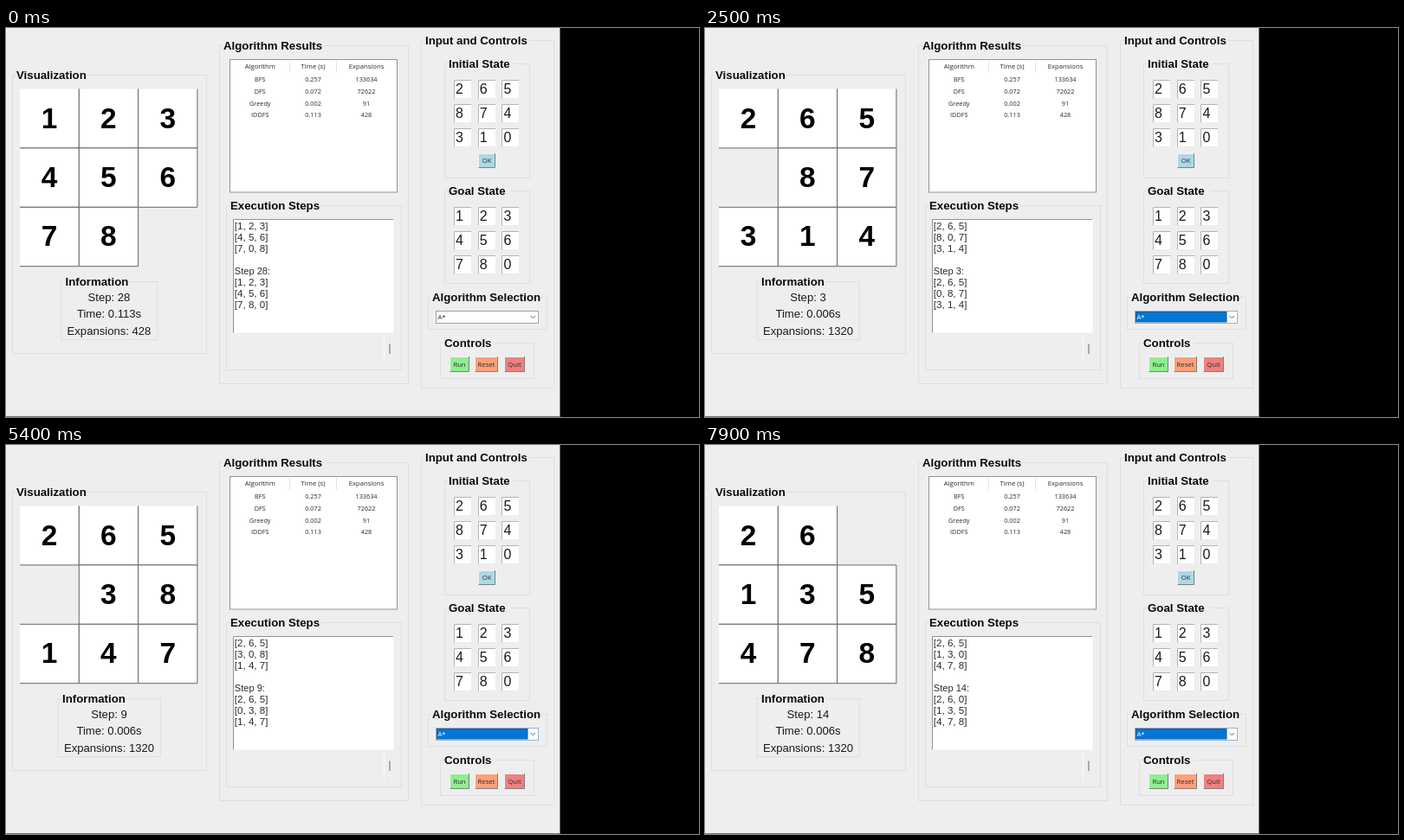
An HTML page that plays this animation: 800x450 px, repeating every 8 s.

```html
<!DOCTYPE html>
<html lang="en">
<head>
<meta charset="utf-8">
<title>Eight puzzle solver</title>
<style>
html, body { margin: 0; width: 100%; height: 100%; overflow: hidden; background: #000; }
svg { display: block; width: 800px; height: 450px; }
text { font-family: "Liberation Sans", Arial, sans-serif; font-size: 13.1px; fill: #1a1a1a; white-space: pre; }
.title { font-weight: bold; font-size: 13.25px; fill: #0a0a0a; }
.tile { font-weight: bold; font-size: 33.4px; fill: #000; }
.entry { font-size: 16px; }
.log { font-size: 11.6px; fill: #2a2a2a; }
.step { font-size: 11.1px; fill: #2a2a2a; }
.ui { font-family: "Open Sans", "Noto Sans", sans-serif; font-size: 7.7px; fill: #2a2a2a; }
.cell { font-size: 7.3px; }
.mid { text-anchor: middle; }
</style>
</head>
<body>
<svg id="stage" viewBox="0 0 800 450"></svg>
<script>
const LOOP = 8000, FIRST_STEP = 1300, STEP_TIME = 500, SELECT_AT = 100;
const BG = '#eeeeef', FRAME = '#dfdfe0';
const stage = document.getElementById('stage');

function add(name, attrs, parent = stage, content) {
  const el = document.createElementNS('http://www.w3.org/2000/svg', name);
  for (const key in attrs) el.setAttribute(key, attrs[key]);
  if (content !== undefined) el.textContent = content;
  parent.appendChild(el);
  return el;
}
const rect = (x, y, width, height, fill, stroke = 'none', parent = stage) =>
  add('rect', { x, y, width, height, fill, stroke }, parent);
const text = (x, y, content, cls = '', parent = stage) => add('text', { x, y, class: cls }, parent, content);
const path = (d, stroke, parent = stage, fill = 'none') => add('path', { d, stroke, fill }, parent);
const group = () => add('g', {});
const show = (el, on) => el.setAttribute('display', on ? 'inline' : 'none');

function frame(label, x, y, right, bottom, gap) {
  rect(x + .5, y + .5, right - x, bottom - y, 'none', FRAME);
  rect(x + 4, y - 6, gap, 13, BG);
  text(x + 5, y + 4.8, label, 'title');
}

function bevel(x, y, w, h, fill, topLeft, bottomRight) {
  rect(x, y, w, h, fill);
  path(`M${x + .5} ${y + h}V${y + .5}H${x + w}`, topLeft);
  path(`M${x + .5} ${y + h - .5}H${x + w - .5}V${y}`, bottomRight);
}

function button(label, x, y, w, h, fill) {
  bevel(x, y, w, h, fill, '#f4f4f4', '#808080');
  text(x + w / 2, y + h / 2 + 2.5, label, 'ui mid');
}

function entryGrid(digits, top) {
  [...digits].forEach((digit, i) => {
    const x = 517 + i % 3 * 27.7, y = top + Math.floor(i / 3) * 28;
    bevel(Math.round(x), y, 21, 22, '#fff', '#b4b4b4', '#ececec');
    text(x + 2, y + 16.4, digit, 'entry');
  });
}

// Static window
rect(0, 0, 639.5, 450, BG);
rect(0, 449, 639.5, 1, '#777');
frame('Visualization', 7, 54, 231, 376, 83);
frame('Algorithm Results', 246, 20, 464, 411, 115);
frame('Execution Steps', 254, 205, 456, 395, 106);
frame('Input and Controls', 479, 14, 632, 416, 121);
frame('Initial State', 506, 41, 604, 173, 76);
frame('Goal State', 506, 188, 604, 295, 73);
frame('Algorithm Selection', 487, 311, 624, 348, 126);
frame('Controls', 501, 364, 609, 405, 60);

rect(258.5, 36.5, 193, 153.5, '#fff', '#929292');
path('M327.5 38V52M381.5 38V52', '#e2e2e2');
[['Algorithm', 'Time (s)', 'Expansions'], ['BFS', '0.257', '133634'], ['DFS', '0.072', '72622'],
 ['Greedy', '0.002', '91'], ['IDDFS', '0.113', '428']].forEach((row, r) =>
  row.forEach((value, c) =>
    text([293.3, 354.5, 416][c], r ? 48.5 + r * 13.7 : 47, value, r ? 'ui cell mid' : 'ui mid')));

bevel(262, 221, 186, 132, '#fff', '#929292', '#f8f8f8');
path('M436.5 355V388', '#fafafa');
entryGrid('265874310', 60);
entryGrid('123456780', 207);
button('OK', 545, 145, 20, 17, '#add8e6');
button('Run', 512, 380, 23, 18, '#90ee90');
button('Reset', 541, 380, 27, 18, '#ffa07a');
button('Quit', 575, 380, 24, 18, '#f08080');

// Parts that change
const board = group();
const infoBox = rect(0, 293.5, 0, 67, 'none', FRAME);
const infoGap = rect(0, 287, 74, 13, BG);
const infoTitle = text(0, 297.8, 'Information', 'title');
const info = [316.2, 335.3, 354.6].map(y => text(119, y, '', 'mid'));
const log = group();
const arrows = path('M440 362L443 357L446 362ZM440 381L443 386L446 381Z', 'none', stage, '#909090');
const thumb = path('M443 365.5V377', '#666');
const comboBox = rect(496.5, 327.5, 118, 14, '#fff', '#999');
const comboFill = rect(497.5, 328.5, 104.5, 11.5, '#0078d7', '#2a5580');
const comboText = text(498.5, 337, 'A*', 'ui');
path('M605.5 333L608.3 335.8L611 333', '#666');
const cursor = path('M0 0V10L2.4 7.9L4.1 11.6L5.6 10.9L4 7.3H7Z', '#333', stage, '#fff');
cursor.setAttribute('stroke-width', .8);

// Each move names the cell the blank slides to
const states = ['265874310'];
for (const cell of [5, 4, 3, 6, 7, 8, 5, 4, 3, 6, 7, 8, 5, 2]) {
  const next = [...states.at(-1)], blank = next.indexOf('0');
  [next[blank], next[cell]] = [next[cell], '0'];
  states.push(next.join(''));
}

function drawBoard(state) {
  const edgeX = c => 16 + c * 68.3, edgeY = r => 70.5 + r * 68.4;
  [...state].forEach((digit, i) => {
    if (digit === '0') return;
    const c = i % 3, r = Math.floor(i / 3);
    const x = edgeX(c), y = edgeY(r), right = edgeX(c + 1), bottom = edgeY(r + 1);
    rect(x, y, right - x, bottom - y, '#fff', 'none', board);
    let d = `M${right} ${y}V${bottom}H${x}`;
    if (c) d += `V${y}`;
    if (r) d += `M${x} ${y}H${right}`;
    path(d, '#666', board);
    text(50 + c * 68.4, 115.6 + r * 68.4, digit, 'tile mid', board);
  });
}

function drawLog(step, state, previous) {
  const rows = s => s.match(/.../g).map(row => `[${[...row].join(', ')}]`);
  const lines = [`Step ${step}:`, ...rows(state)];
  if (step > 1) lines.unshift(...rows(previous), '');
  lines.forEach((line, i) =>
    text(263.8, 232.5 + i * 13.05, line, line[0] === 'S' ? 'step' : 'log', log));
}

let shown = -1;
function showStep(step) {
  if (step === shown) return;
  shown = step;
  const running = step > 0, n = running ? step : 28;
  const state = running ? states[step] : '123456780';
  board.replaceChildren();
  log.replaceChildren();
  drawBoard(state);
  drawLog(n, state, running ? states[step - 1] : '123456708');
  const [time, expansions] = running ? ['0.006', '1320'] : ['0.113', '428'];
  info[0].textContent = `Step: ${n}`;
  info[1].textContent = `Time: ${time}s`;
  info[2].textContent = `Expansions: ${expansions}`;
  const left = running ? 60 : 63.5;
  infoBox.setAttribute('x', left);
  infoBox.setAttribute('width', 2 * (119.2 - left));
  infoGap.setAttribute('x', left + 4);
  infoTitle.setAttribute('x', left + 5);
  show(arrows, step === 1);
  show(thumb, step !== 1);
}

// time, x, y
const route = [[100, 545, 334], [700, 521, 387], [1250, 521, 387], [1500, 510, 398.5], [1900, 430, 449]];
function moveCursor(t) {
  const i = route.findIndex(point => point[0] > t);
  show(cursor, i > 0);
  if (i < 1) return;
  const [t0, x0, y0] = route[i - 1], [t1, x1, y1] = route[i];
  const p = (t - t0) / (t1 - t0), k = p * p * (3 - 2 * p);
  cursor.setAttribute('transform', `translate(${x0 + (x1 - x0) * k} ${y0 + (y1 - y0) * k})`);
}

function render(t) {
  showStep(t < FIRST_STEP ? 0 : Math.min(14, 1 + Math.floor((t - FIRST_STEP) / STEP_TIME)));
  const selected = t >= SELECT_AT;
  show(comboFill, selected);
  comboText.style.fill = selected ? '#fff' : '#2a2a2a';
  comboBox.setAttribute('stroke', selected ? '#8ab4da' : '#a0a0a0');
  moveCursor(t);
}

const start = performance.now();
function tick() {
  render((performance.now() - start) % LOOP);
  requestAnimationFrame(tick);
}
tick();
</script>
</body>
</html>
```
